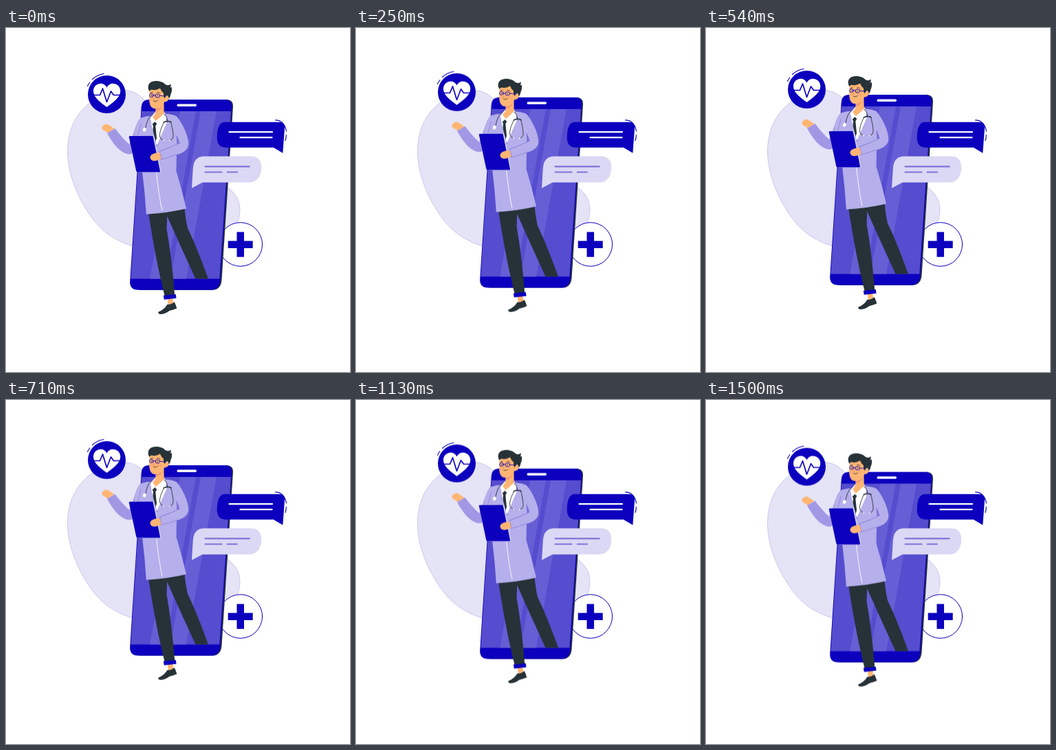
Recreate the animation shown at these times as an HTML page. Size 500x500 px, loop 1540 ms.

```html
<!DOCTYPE html>
<html lang="en">
<head>
<meta charset="utf-8">
<title>Online doctor</title>
<style>
  html, body { margin: 0; width: 100%; height: 100%; overflow: hidden; background: #fff; }
  svg { display: block; width: 100%; height: 100%; }
  .main { fill: #0c00be; }
  .dark { fill: #263238; }
  .skin { fill: #ffb573; }
  .coat { fill: #b5afeb; }
  .sleeve { fill: #a098e5; }
  .white { fill: #fff; }
  .line { fill: none; stroke: #0c00be; stroke-width: 1.2; stroke-linecap: round; stroke-linejoin: round; }
  .ink { fill: none; stroke: #263238; stroke-width: .9; stroke-linecap: round; stroke-linejoin: round; }
  .seam { fill: none; stroke: #7d74da; stroke-width: .6; stroke-linecap: round; }
</style>
</head>
<body>
<svg viewBox="0 0 500 500" xmlns="http://www.w3.org/2000/svg">
  <defs>
    <clipPath id="screen"><path d="M197 121H327L310.300 364.500H181.300Z"/></clipPath>
  </defs>

  <!-- backdrop -->
  <path fill="#e5e3f6" stroke="#a79fe6" stroke-width=".5" d="M89.500 180C89.500 150 100 128 117 113C132 99 152 90 174 90.500C188 92 197 99 205 109C230 140 262 200 300 220C324 229 340 243 340 264C340 284 330 295 314 304C282 322 226 331 187 318C160 310 139 297 122 272C104 246 89.500 212 89.500 180Z"/>

  <g>
    <circle class="white" cx="340.800" cy="314.500" r="31.800"/>
    <circle class="line" style="stroke-width:1" cx="340.800" cy="314.500" r="31.800"/>
    <path class="main" d="M335.500 296.500H346V309.500H358.700V320H346V332.700H335.500V320H322.700V309.500H335.500Z"/>
  </g>

  <g id="float">
    <!-- badge -->
    <circle class="main" cx="146.500" cy="96.500" r="27.500"/>
    <path class="white" d="M146.500 115C138 108.500 127 101.500 127 91.500C127 80 142 76.500 146.500 86.500C151 76.500 166.300 80 166.300 91.500C166.300 101.500 155 108.500 146.500 115Z"/>
    <path class="line" style="stroke-width:1.700" d="M126.500 97.500H136.500L140.500 88L146.500 107.500L152.500 92L156.500 97.500H166.500"/>
    <path class="line" d="M118.500 84.500Q119.800 81.500 121.800 79M125.500 74.500Q132.500 68 142 66.500"/>

    <!-- phone -->
    <path class="dark" d="M210 104H320Q330.500 104 330 114.500L313.500 367Q312 380.800 300 380.800H194Z"/>
    <path class="main" d="M208 104H318.500Q329 104 328.300 114.500L311.700 367Q310.500 380.800 298 380.800H192.500Q179.300 380.800 180.200 367.500L196.700 115Q197.500 104 208 104Z"/>
    <g clip-path="url(#screen)">
      <path fill="#554ccf" d="M170 121H330V365H170Z"/>
      <path fill="#665ed5" d="M253 121H276L232 365H209ZM283 121H306L262 365H239Z"/>
    </g>
    <path d="M250.200 112.200H275.300" stroke="#fff" stroke-width="3.400" stroke-linecap="round"/>

    <!-- legs -->
    <path class="dark" d="M231 266L259.500 262Q261 278 264 291Q276 315 294 364.500H275.500Q254 318 233.500 272Z"/>
    <path class="skin" d="M234.500 392L242 391.500L243.500 400.500L236 402.500Z"/>
    <path class="dark" d="M207 268L234.500 265L233.500 292Q241 334 245.300 389H230.500Q218 340 207 268Z"/>
    <path class="main" d="M228.800 388.800L246.800 387L247.500 392.800L229.800 394.700Z"/>
    <path class="dark" d="M234.500 401.800Q240 402 244.800 398.200Q247 402.500 248.300 407.500Q243 409.500 237.500 411Q232 415.500 225 416Q221 416 221.300 412.800Q230 409.500 234.500 401.800Z"/>

    <!-- raised arm -->
    <path class="skin" d="M147.500 152.500C144.500 149.500 140 148.500 139.300 145.800C138.800 143.500 143 139.300 146 139.700C150 140.200 153 144 157.500 146.200Z"/>
    <path class="sleeve" d="M197 130C191 133 188 145 184 157L179 169Q169 160 158.500 146L147 152.800C154 166 164 180 176.500 183.300C184 184.500 190 179 195 170Z"/>

    <!-- torso -->
    <path class="white" d="M210 130L217 122L231 123L234 138L220 170L211 166Z"/>
    <path class="skin" d="M217.500 111L229.500 110L229.700 124.500Q224 131.500 217.500 135.200Q214 132.500 213 128.500Q217.500 126 217.500 120Z"/>
    <path fill="#f0997a" d="M217.500 116.500Q224 116 228 111.500Q226 119.500 217.700 120.800Z"/>
    <path class="dark" d="M212.500 139L216 136L219.300 139L217.300 142.500L219 160L216 169L212.500 158L214 142.500Z"/>
    <path class="coat" d="M212 127.500Q203 128 196.500 130.500Q190 136 187 149L186 165L198 208Q202 240 203.800 270.700Q235 269 262 262.500Q256 236 247.500 208L248 184Q265 180 265.300 168C265 155 255 136 247.500 128Q240 124.500 230 124.500L235 136Q227 151 219.500 172L212 143Q210 134 212 127.500Z"/>
    <path fill="#7d74da" d="M247.500 155Q251 161 252.500 167.500L248.500 171.500Z"/>
    <path class="seam" d="M248 184Q238 187.500 225 190.500M252 168Q238 174 223 179.500M196 139Q194 150 191 158"/>
    <path d="M218.500 208Q221.500 240 227 265.500" fill="none" stroke="#fff" stroke-width=".9"/>
    <path class="white" d="M212 128L217.500 135L213 139.500L209.800 132ZM229.700 124.500L234 131L225 138L218 135.200Z"/>

    <!-- stethoscope -->
    <path class="ink" d="M210.500 127.500Q205 133 203 145M230 125Q234 128 234.800 134M228.700 137Q235 133.500 240.300 136.500M229.500 137C225 146 222.500 154 223.800 158.500Q225 162 228.500 163.200M239.800 137C242 147 244 156 242.500 160Q241.500 162.500 238.300 163.300"/>
    <path d="M229.200 137.200Q235 134 240 137" fill="none" stroke="#263238" stroke-width="1.500"/>
    <ellipse class="white" cx="201.300" cy="147.700" rx="2.300" ry="3" transform="rotate(15 201.300 147.700)"/>
    <circle class="white" cx="229" cy="163.300" r="1"/>
    <circle class="white" cx="238" cy="163.400" r="1"/>

    <!-- clipboard -->
    <path fill="#dad7f5" d="M182 156.800L213.700 156.300Q215 156.400 215.300 158L225.300 208Q225.500 209.500 224 209.700L193 209.700Z"/>
    <path class="main" d="M180 157L212.300 156.700Q213.500 156.800 213.800 158L224 208Q224.200 209.500 222.800 209.600L191.300 209.500Q189.800 209.400 189.300 208L178.800 158.500Q178.600 157.100 180 157Z"/>
    <path class="skin" d="M224.500 181C220 180.800 214 182 211.300 184.500C208.800 186.500 209.300 189.500 211 191.500C213.500 194 218 193.300 221.500 191.800L226.300 190Z"/>
    <path class="coat" d="M223.500 179.500Q239 174 253 167L259 179Q245 187 226 190.800Z"/>
    <path class="seam" d="M223.500 179.500L226 190.800M223.500 179.500Q239 174 252.500 167M226 190.800Q238 188 248 184"/>

    <!-- head -->
    <path class="skin" d="M209.500 89C207.500 97 207.500 108 210 113C212 117.500 218 118 223 116C227 114.500 229 111 230.500 107C234 108 237 104.500 236.800 101.300C236.500 98 233 97.500 231 100L232 87L221 84Z"/>
    <path class="dark" d="M208.500 92C205.500 88 206 81 211 78.500C217 75.500 227 77 231 81.500C234 84 238 83.500 239.500 81.200Q240.500 83.500 238.500 86.500Q240.500 86.500 240.800 85.300Q241.800 92 239.500 96Q239 100.500 236.500 103Q236.800 98 233.300 98.300L230.300 102.300Q228.500 98 229 94.500Q225.500 92 224 87.500Q217 91.500 211.500 89.500Q209.500 90 208.500 92Z"/>
    <ellipse cx="212.300" cy="104" rx="2" ry="1.500" fill="#f0997a" opacity=".5"/>
    <ellipse cx="224" cy="104" rx="2.300" ry="1.600" fill="#f0997a" opacity=".5"/>
    <path class="ink" d="M210 94.500L213 93.500M219.500 93.800Q222 93 224 94.800M214.500 106.300Q217.500 108 220.500 105.500" style="stroke-width:.8"/>
    <path d="M215.500 98L214.300 103.500L216.300 103.700" fill="none" stroke="#ed8a63" stroke-width=".8"/>
    <g class="line" style="stroke-width:.9">
      <ellipse cx="211.500" cy="98" rx="2.800" ry="2.500"/>
      <ellipse cx="220.300" cy="98.600" rx="3.300" ry="2.700"/>
      <path d="M214.300 97.800Q215.600 96.800 217 98M223.600 98.200L231.500 99.300"/>
    </g>
    <circle class="dark" cx="211.700" cy="98.200" r=".8"/>
    <circle class="dark" cx="220" cy="98.700" r=".8"/>
  </g>

  <!-- chat -->
  <path class="main" d="M318.500 136.800H397Q405.500 136.800 405 146L402.300 181.800L388.800 173.800H320Q306.300 173.800 306.700 158.500Q307 136.800 318.500 136.800Z"/>
  <path d="M324.500 151.200H387M340.500 159.200H386.500" stroke="#fff" stroke-width="2.200" stroke-linecap="round"/>
  <path class="line" d="M391.500 133.800Q404.500 134 407.500 150M407.300 155.500Q407.300 160 406 163.500"/>
  <path fill="#dad8f4" d="M287 186.500H357Q371.500 187 371.200 204C370.500 218 363 224.500 353 224.500H285.500L270 232.800L271.800 204Q273 187 287 186.500Z"/>
  <path d="M289.500 201.300H353.700M289.500 209.500H313.500M321.700 209.500H336" stroke="#7d74da" stroke-width="2.200" stroke-linecap="round"/>
</svg>
<script>
  // Linear up-and-down float, held at 24 steps per second.
  const loop = 1540, steps = 37, rise = 10, base = 0.54;

  const lift = n => {
    const p = ((n + 1) % steps) / steps;
    return base - rise * (1 - Math.abs(1 - 2 * p));
  };

  const frames = Array.from({ length: steps + 1 }, (_, n) => ({
    offset: n === steps ? 1 : Math.round(n * 100 / 24) * 10 / loop,
    transform: `translateY(${lift(n % steps).toFixed(3)}px)`,
    easing: 'steps(1, end)'
  }));

  document.getElementById('float').animate(frames, { duration: loop, iterations: Infinity });
</script>
</body>
</html>
```
